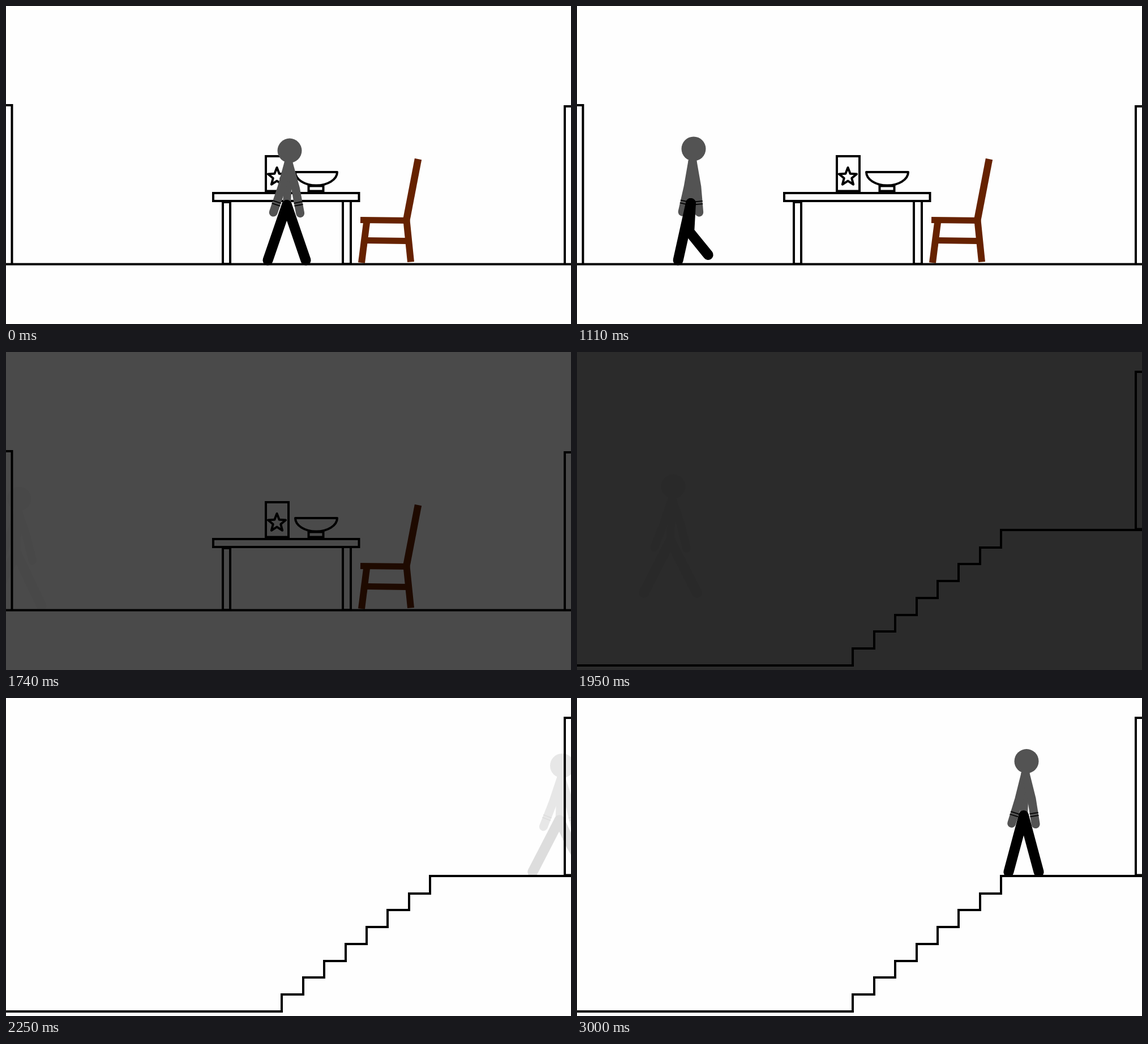
An HTML page with a canvas for the animation above (3600 ms loop, 998 px wide and 561 px high).

```html
<!DOCTYPE html>
<html lang="en">
<head>
<meta charset="utf-8">
<title>Walking upstairs</title>
<style>
  html, body { margin: 0; width: 100%; height: 100%; overflow: hidden; background: #fefefe; }
  canvas { display: block; }
</style>
</head>
<body>
<canvas id="stage" width="998" height="561"></canvas>
<script>
const W = 998, H = 561, LOOP = 3600, TICK = 30;
const SKIN = '#535353', INK = '#000', PAPER = '#fefefe', WOOD = '#662200';
const FLOOR = 455.5, LANDING = 314, GHOST = 0.03;
// Ticks at which the walk leaves the room, the stairs appear and the walk resumes.
const EXIT = 56, SWITCH = 60, ARRIVE = 66, RESUME = 70, END = 96;

const ctx = document.getElementById('stage').getContext('2d');
const layer = document.createElement('canvas');
layer.width = W;
layer.height = H;
const fig = layer.getContext('2d');

// Key moments of the walk; swing is the largest thigh angle, both angles in degrees.
const keys = [
  { at: 0, x: 501, phase: 0, swing: 19 },
  { at: 12, x: 412, phase: 75, swing: 27 },
  { at: 33, x: 206, phase: 260, swing: 27 },
  { at: EXIT, x: 6, phase: 360, swing: 27 },
  { at: SWITCH, x: 6, phase: 360, swing: 27 },
  { at: ARRIVE, x: 990, phase: 360, swing: 27 },
  { at: RESUME, x: 990, phase: 360, swing: 27 },
  { at: END, x: 794, phase: 540, swing: 15 }
];

const mix = (a, b, k) => a + (b - a) * k;
const ramp = (v, from, to) => Math.min(1, Math.max(0, (v - from) / (to - from)));
const rad = degrees => degrees * Math.PI / 180;

function stateAt(tick) {
  const i = Math.max(1, keys.findIndex(key => key.at >= tick));
  const a = keys[i - 1], b = keys[i], k = ramp(tick, a.at, b.at);
  return {
    x: mix(a.x, b.x, k),
    phase: rad(mix(a.phase, b.phase, k)),
    swing: mix(a.swing, b.swing, k),
    ground: mix(FLOOR, LANDING, ramp(tick, SWITCH, ARRIVE))
  };
}

// Point reached from p at an angle from straight down.
const reach = ([x, y], length, angle) =>
  [x + length * Math.sin(rad(angle)), y + length * Math.cos(rad(angle))];

const chain = (root, upper, lower, angle, bend) => {
  const joint = reach(root, upper, angle);
  return [root, joint, reach(joint, lower, angle + bend)];
};

function leg(hip, phase, swing) {
  const thigh = -swing * Math.cos(phase) - 8 * Math.abs(Math.sin(phase));
  return chain(hip, 50, 53, thigh, 43 * Math.max(0, -Math.sin(phase)));
}

function poseOf({ phase, swing }) {
  const neck = [-2, 22], hip = [-5, 96];
  const spread = 8 + 0.4 * swing * Math.abs(Math.cos(phase));
  return {
    torso: [neck, hip],
    arms: [chain(neck, 46, 45, -spread, -3), chain(neck, 46, 45, spread, -5)],
    legs: [leg(hip, phase, swing), leg(hip, phase + Math.PI, swing)]
  };
}

function trace(c, points) {
  c.beginPath();
  points.forEach(p => c.lineTo(...p));
}

function stroke(c, points, width, color = INK) {
  c.strokeStyle = color;
  c.lineWidth = width;
  trace(c, points);
  c.stroke();
}

function cuffs([, elbow, hand]) {
  const angle = Math.atan2(elbow[1] - hand[1], elbow[0] - hand[0]);
  const ux = Math.cos(angle), uy = Math.sin(angle);
  for (const d of [14.5, 19.5]) {
    const x = hand[0] + ux * d, y = hand[1] + uy * d;
    stroke(fig, [[x - uy * 7, y + ux * 7], [x + uy * 7, y - ux * 7]], 1.8);
  }
}

function drawFigure(tick) {
  const state = stateAt(tick);
  const { torso, arms, legs } = poseOf(state);
  const drop = Math.max(...legs.map(points => points[2][1]));
  fig.clearRect(0, 0, W, H);
  fig.save();
  fig.translate(state.x, state.ground - 7 - drop);
  fig.lineCap = fig.lineJoin = 'round';
  stroke(fig, torso, 14, SKIN);
  arms.forEach(arm => stroke(fig, arm, 15, SKIN));
  fig.fillStyle = SKIN;
  fig.beginPath();
  fig.arc(0, 0, 21.5, 0, 7);
  fig.fill();
  arms.forEach(cuffs);
  legs.forEach(points => stroke(fig, points, 18));
  fig.restore();

  const fadeOut = 1 - ramp(tick, 42, 49), fadeIn = ramp(tick, RESUME, RESUME + 8);
  ctx.globalAlpha = Math.max(GHOST, fadeOut, fadeIn);
  ctx.drawImage(layer, 0, 0);
  ctx.globalAlpha = 1;
}

const line = (...points) => stroke(ctx, points, 4);
const plank = (width, ...points) => stroke(ctx, points, width, WOOD);

function drawStar(x, y, outer, inner) {
  const points = Array.from({ length: 10 }, (_, i) =>
    reach([x, y], i % 2 ? inner : outer, 180 + 36 * i));
  trace(ctx, points);
  ctx.closePath();
  ctx.stroke();
}

function drawTable() {
  ctx.strokeRect(366, 330, 257.5, 14);
  ctx.strokeRect(383, 346, 13, 109);
  ctx.strokeRect(595, 344, 14, 111);
  ctx.strokeRect(459, 265, 40, 61.5);
  ctx.strokeRect(534.5, 317.5, 26, 9);
  ctx.lineJoin = 'round';
  ctx.beginPath();
  ctx.ellipse(548, 293, 37, 23.5, 0, 0, Math.PI);
  ctx.closePath();
  ctx.stroke();
  drawStar(478.5, 301.5, 16.4, 7.1);
  ctx.lineJoin = 'miter';
}

function drawChair() {
  plank(12.5, [728, 270], [707, 379]);
  plank(11, [626, 377.5], [713, 378.5]);
  plank(12, [637, 382], [628, 453]);
  plank(12, [707.5, 378], [715, 451.5]);
  plank(11, [636, 413.5], [708, 414.5]);
}

function drawRoom() {
  line([0, FLOOR], [W, FLOOR]);
  line([-5, 175], [10.5, 175], [10.5, FLOOR]);
  line([W + 5, 177], [987, 177], [987, FLOOR]);
}

function drawStairs() {
  const stepX = i => Math.round(487.3 + 37.43 * i);
  const stepY = i => i < 8 ? Math.round(552.6 - 29.7 * i) : LANDING;
  const points = [[0, stepY(0)]];
  for (let i = 0; i < 8; i++) points.push([stepX(i), stepY(i)], [stepX(i), stepY(i + 1)]);
  line(...points, [W, LANDING]);
  line([W + 5, 35], [987, 35], [987, 312.5], [W, 312.5]);
}

function draw(time) {
  const tick = Math.min(END, Math.max(0, Math.floor(time / TICK) - 4));
  const upstairs = tick >= SWITCH;
  ctx.fillStyle = PAPER;
  ctx.fillRect(0, 0, W, H);
  ctx.strokeStyle = INK;
  ctx.lineWidth = 4;
  if (!upstairs) {
    drawTable();
    drawChair();
  }
  drawFigure(tick);
  if (upstairs) drawStairs();
  else drawRoom();

  const dark = upstairs ? 1 - ramp(tick, SWITCH, ARRIVE) : 0.99 * ramp(tick, 49, EXIT);
  ctx.fillStyle = `rgba(0, 0, 0, ${dark})`;
  ctx.fillRect(0, 0, W, H);
}

const start = performance.now();
function loop() {
  draw((performance.now() - start) % LOOP);
  requestAnimationFrame(loop);
}
loop();
</script>
</body>
</html>
```
